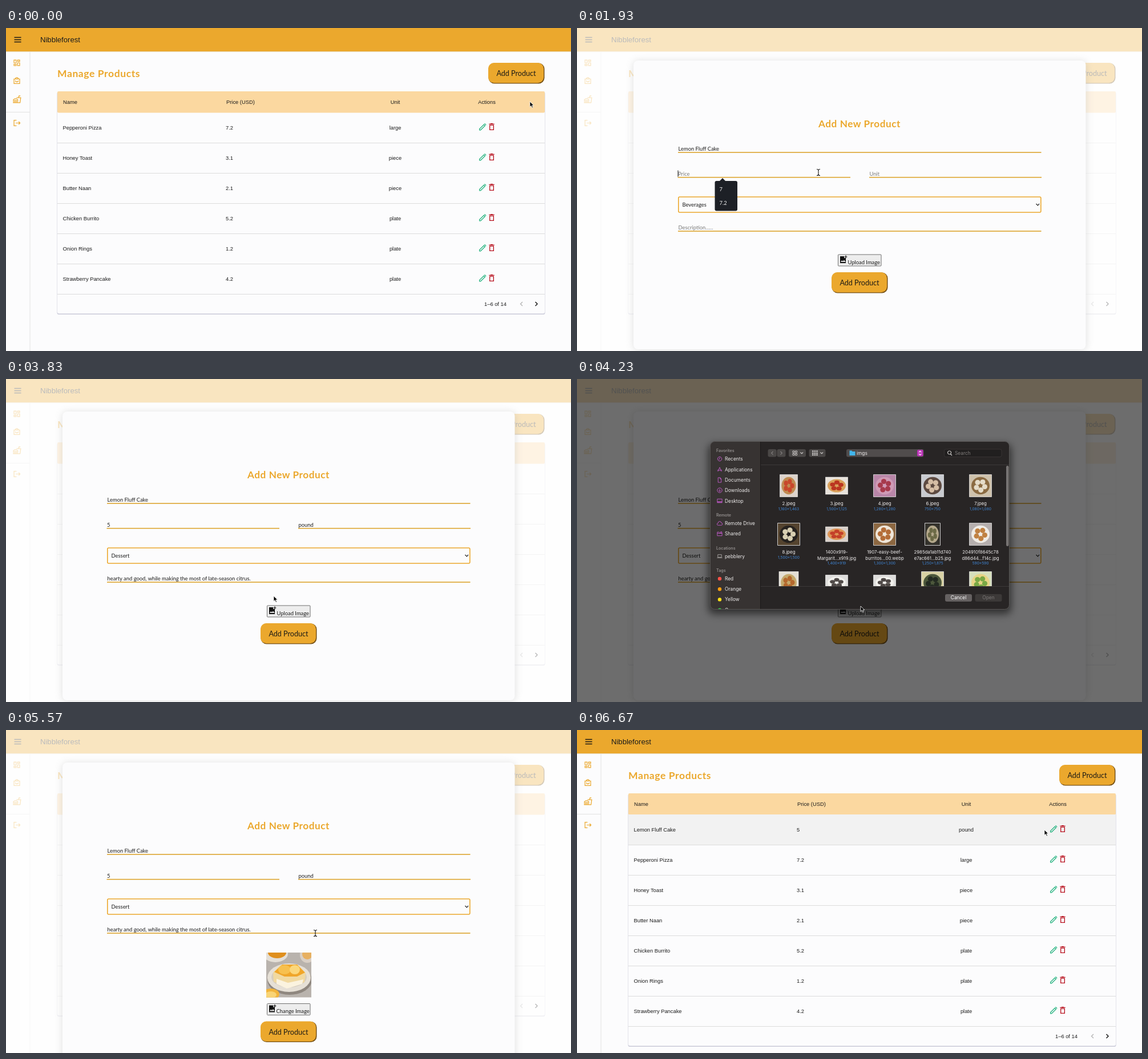
Recreate the animation shown at these times as an HTML page. Size 990 px wide and 566 px high, loop 6.71 s.

```html
<!DOCTYPE html>
<html lang="en">
<head>
<meta charset="utf-8">
<title>Manage products</title>
<style>
  html, body { margin: 0; width: 100%; height: 100%; overflow: hidden; background: #fcfcfd; }
  svg { display: block; width: 990px; height: 566px; }
  text { white-space: pre; }
  .q { font-family: Lato, "Open Sans", sans-serif; }
  .h { font-family: "Liberation Sans", Arial, sans-serif; }
  .m { font-family: Inter, Roboto, sans-serif; }
</style>
</head>
<body>
<svg id="stage" viewBox="0 0 990 566"></svg>
<script>
const LOOP = 6710, GOLD = '#eba82d', PINK = '#c25bcb';
const stage = document.getElementById('stage');

// Drawing helpers: each returns a piece of SVG markup
const rect = (x, y, w, h, fill, r = 0, more = '') =>
  `<rect x="${x}" y="${y}" width="${w}" height="${h}" rx="${r}" fill="${fill}" ${more}/>`;
const text = (x, y, str, cls, size, fill = '#1c1c1c', more = '') =>
  `<text x="${x}" y="${y}" class="${cls}" font-size="${size}" fill="${fill}" ${more}>${str}</text>`;
const mid = 'text-anchor="middle"';
const line = (d, stroke, w = 1, more = '') =>
  `<path d="${d}" fill="none" stroke="${stroke}" stroke-width="${w}" ${more}/>`;
const oval = (x, y, rx, ry, fill) =>
  `<ellipse cx="${x}" cy="${y}" rx="${rx}" ry="${ry}" fill="${fill}"/>`;
const group = (body, more) => `<g ${more}>${body}</g>`;
const icon = (x, y, d, stroke, w = 2, s = .62) =>
  group(line(d, stroke, w), `transform="translate(${x - 12 * s} ${y - 12 * s}) scale(${s})"`);
const clamp = v => Math.max(0, Math.min(1, v));
const ramp = (t, a, b) => clamp((t - a) / (b - a));
const typed = (str, t, a, b) => str.slice(0, Math.floor(str.length * ramp(t, a, b)));
const fade = (t, a, b, d) => Math.min(ramp(t, a, a + d), 1 - ramp(t, b, b + d));

const defs = `<defs>
  <clipPath id="files"><rect x="322" y="151" width="435" height="212"/></clipPath>
  <clipPath id="side"><rect x="234" y="110" width="88" height="293"/></clipPath>
  <clipPath id="photo"><rect x="456" y="390" width="79" height="78.5"/></clipPath>
  <filter id="soft" x="-20%" y="-20%" width="140%" height="140%"><feGaussianBlur stdDeviation="7"/></filter>
</defs>`;

// Cursor stops: time, x, y
const path = [
  [0, 918, 129], [330, 905, 84], [520, 905, 84], [900, 440, 211], [1600, 440, 211],
  [1800, 423, 253], [2080, 423, 253], [2220, 560, 254], [2640, 560, 254], [2820, 436, 309],
  [2970, 436, 311], [3210, 430, 338], [3300, 430, 338], [3460, 430, 350], [3720, 430, 350],
  [3920, 497, 402], [4080, 497, 402], [4200, 497, 398], [4260, 497, 398], [4500, 537, 347],
  [5130, 537, 347], [5260, 456, 300], [5320, 456, 300], [5430, 720, 382], [5480, 720, 382],
  [5565, 542, 356], [5610, 542, 356], [5800, 496, 527], [6050, 496, 527], [6600, 819, 175], [LOOP, 819, 175]
];
function cursorAt(t) {
  const i = Math.max(1, path.findIndex(p => p[0] > t));
  const [a, x, y] = path[i - 1], [b, u, v] = path[i];
  const k = ramp(t, a, b), e = k * k * (3 - 2 * k);
  return [x + (u - x) * e, y + (v - y) * e];
}
const arrow = (x, y) =>
  `<path d="M${x} ${y}v9.3l2.2-2 1.7 3.7 1.6-.7-1.7-3.6h3z" fill="#000" stroke="#fff" stroke-width=".8"/>`;
const beam = (x, y) =>
  line(`M${x - 3} ${y - 5.5}q3 0 3 2v7q0 2 3 2M${x + 3} ${y - 5.5}q-3 0-3 2v7q0 2-3 2`, '#111', 1.1);

function button(x, y) {
  return rect(x + .5, y + .5, 98, 36, '#765117', 10) + rect(x, y, 97, 35.2, GOLD, 10) +
    text(x + 49, y + 23, 'Add Product', 'q', 12.6, '#1c1a16', mid);
}

// Product list page
const foods = [
  ['Lemon Fluff Cake', '5', 'pound'], ['Pepperoni Pizza', '7.2', 'large'], ['Honey Toast', '3.1', 'piece'],
  ['Butter Naan', '2.1', 'piece'], ['Chicken Burrito', '5.2', 'plate'], ['Onion Rings', '1.2', 'plate'],
  ['Strawberry Pancake', '4.2', 'plate']
];
const pencil = 'M4 20v-3L15.5 5.5l3 3L7 20zM17 4l1-.6 2.6 2.6-.6 1';
const trash = 'M7 8v12h10V8zM5 5h14M9 4h6';

function page(added, hover) {
  const rows = added ? foods : foods.slice(1), end = 148 + 53 * rows.length;
  let s = rect(0, 0, 990, 566, '#fcfcfd') + rect(0, 0, 990, 41, GOLD) + rect(0, 41, 990, 1.2, '#e9dfc9') +
    line('M14.5 16.5h12M14.5 20.5h12M14.5 24.5h12', '#1c1a16', 1.4) +
    text(60, 25, 'Nibbleforest', 'h', 13.1) +
    line('M42 42V566M0 147.5H42', '#e2e2e2') +
    icon(19, 61, 'M4 4h6v8H4zM14 4h6v4h-6zM4 16h6v4H4zM14 12h6v8h-6z', GOLD) +
    icon(19, 92.5, 'M4 7h16v13H4zM8 7a4 4 0 0 1 8 0M8 11a4 4 0 0 0 8 0', GOLD) +
    icon(19, 125, 'M2 15a6.5 5 0 0 1 13 0zM1 18.5h15M1 21.5h20l2-14H11M17 7l1-5h4', GOLD) +
    icon(19, 166.5, 'M11 4H4v16h7M9 12h12M17 8l4 4-4 4', GOLD) +
    text(90, 86, 'Manage Products', 'q', 17.5, GOLD, 'font-weight="700" letter-spacing=".6"') +
    button(845, 61) +
    rect(89.5, 112, 855, end - 76, '#c9c9d8', 3) + rect(90, 111, 854, end - 76.5, '#fcfcfd', 3) +
    rect(90, 111, 854, 37.5, '#fbd8a0', 2) +
    text(100, 133, 'Name', 'h', 9.33) + text(386, 133, 'Price (USD)', 'h', 9.33) +
    text(682, 133, 'Unit', 'h', 9.33, '#1c1c1c', mid) + text(842.5, 133, 'Actions', 'h', 9.33, '#1c1c1c', mid);
  rows.forEach(([name, price, unit], i) => {
    const y = 148 + 53 * i;
    if (hover === i) s += rect(90, y, 854, 53, '#f2f2f2');
    s += text(99.5, y + 30, name, 'h', 9.33) + text(385, y + 30, price, 'h', 9.33) +
      text(682, y + 30, unit, 'h', 9.33, '#1c1c1c', mid) +
      icon(835, y + 25.5, pencil, '#2db584', 2, .667) + icon(851, y + 25, trash, '#b8111f', 2, .667) +
      line(`M90 ${y + 53.5}H944`, '#dcdcdc');
  });
  return s + text(838, end + 21, '1–6 of 14', 'h', 9.33) +
    line(`M905 ${end + 14}l-3.5 3.5 3.5 3.5`, '#b5b5b5', 1.4) +
    line(`M927.5 ${end + 14}l3.5 3.5-3.5 3.5`, '#1c1c1c', 1.5);
}

// Form for a new product
const lemonPhoto = () => group(
  rect(456, 390, 79, 79, '#b9b3ad') + oval(472, 392, 22, 15, '#e4dfd7') + oval(475, 390, 16, 10, '#df8f1d') +
  oval(528, 394, 13, 14, '#d9cfc5') + oval(528, 393, 9, 9, '#e7b061') +
  oval(497, 438, 39, 26, '#8f877f') + oval(496, 434, 38, 25, '#e6e0d6') + oval(496, 433, 31, 18, '#d6cdbf') +
  '<path d="M468 425l13-13 30-1 14 15-2 16-30 9-24-10z" fill="#f1d9a0"/>' +
  '<path d="M470 424l14-13 26 0 14 14-14 7-22 0z" fill="#f0a62a"/>' +
  oval(488, 420, 11, 8, '#f7c04e') + oval(506, 420, 9, 8, '#fbd77b') +
  '<path d="M474 436l20 7 27-6-2 8-27 8-18-8z" fill="#fbf3df"/>' +
  oval(464, 463, 15, 10, '#f2b43a') + oval(464, 464, 10, 6, '#f9d475'), 'clip-path="url(#photo)"');

function field(x, end, y, value, hint) {
  return text(x + .5, y - 3, value || hint, 'q', 9.4, value ? '#1c1c1c' : '#7b7b7b') +
    rect(x, y - .8, end - x, 1.6, '#dda52f');
}

function form(t) {
  const photo = t >= 5520, dy = photo ? 82.5 : 0;
  const price = t >= 2080 ? '5' : '';
  let s = rect(99, 58, 793, 506 + dy, '#9a9a9a', 8, 'filter="url(#soft)" opacity=".3"') +
    rect(99, 57, 792.5, 506 + dy, '#fcfcfd', 8) +
    text(495, 174, 'Add New Product', 'q', 17.2, GOLD, mid + ' font-weight="700" letter-spacing=".55"') +
    field(177, 813.5, 218, typed('Lemon Fluff Cake', t, 1000, 1650), 'Name') +
    field(176.5, 479, 261.7, price, 'Price') +
    field(512, 814, 261.7, typed('pound', t, 2280, 2600), 'Unit') +
    rect(177.8, 296, 635, 27, '#fcfcfd', 2, `stroke="${GOLD}" stroke-width="1.6"`) +
    text(184.5, 312.7, t < 3290 ? 'Beverages' : 'Dessert', 'q', 9.4) +
    line('M804.5 308l2.8 2.8 2.8-2.8', '#222', 1.2) +
    field(177, 813.5, 356, typed('hearty and good, while making the most of late-season citrus.', t, 3490, 3700), 'Description......');
  if (t >= 1840 && !price) {
    s += line('M177 249.5v11', '#111') +
      '<path d="M249 269l6-6 6 6z" fill="#1d2026"/>' + rect(241.5, 268, 39.5, 52.5, '#1d2026', 3) +
      text(249.5, 286, '7', 'q', 9.4, '#eee') + text(249.5, 310, '7.2', 'q', 9.4, '#eee');
  }
  if (photo) s += lemonPhoto();
  const y = 397 + dy;
  return s + rect(457.5, y, 75.5, 20, '#ededed', 1, 'stroke="#6f6f6f"') +
    `<path d="M461 ${y + 3}h7v3h3v9h-10z" fill="#111"/>` +
    `<path d="M462 ${y + 13}l2.3-3 1.6 2 2-2.6 2.8 3.6z" fill="#ededed"/>` +
    line(`M471 ${y + 1.5}v5M468.5 ${y + 4}h5`, '#111', 1.2) +
    text(photo ? 473.5 : 474.5, y + 16.5, photo ? 'Change Image' : 'Upload Image', 'q', 9.4) +
    button(446, 428 + dy);
}

function menu(y) {
  const pick = Math.max(0, Math.min(5, Math.floor((y - 273.8) / 14.4)));
  return rect(172, 272, 596, 94, '#000', 5, 'filter="url(#soft)" opacity=".35"') +
    rect(172, 270, 595.5, 93, '#5f5d59', 5, 'stroke="#4b4a47" stroke-width=".8"') +
    rect(176, 273.8 + 14.4 * pick, 588, 14.4, '#d350cf', 3) +
    line('M178.5 310l2 2.4 3.6-5.6', '#fff', 1.1) +
    ['Salad', 'Breakfast', 'Beverages', 'Main Course', 'Dessert', 'Combo Pack']
      .map((name, i) => text(188, 284 + 14.4 * i, name, 'm', 8.25, '#fff')).join('');
}

// File chooser: name lines, size, thumbnail width and height, backdrop, plate, food
const files = [
  ['2.jpeg', '1,160×1,463', 30, 38, '#ddd3cb', '#c08b52', '#c8472c'],
  ['3.jpeg', '1,500×1,125', 38, 29, '#e8e2da', '#d9a05a', '#bb3520'],
  ['4.jpeg', '1,280×1,280', 38, 38, '#b986a8', '#cf9ab5', '#a73a4c'],
  ['6.jpeg', '750×750', 38, 38, '#c9cbd0', '#5d4a41', '#d5bda5'],
  ['7.jpeg', '1,080×1,080', 38, 38, '#cfc2ac', '#8b6b42', '#e5dcc9'],
  ['8.jpeg', '1,500×1,500', 38, 38, '#55442f', '#26221f', '#d8cfb2'],
  ['1400x919-|Margarit…x919.jpg', '1,400×919', 38, 25, '#d9cfc8', '#dd9555', '#c43f29'],
  ['1907-easy-beef-|burritos…00.webp', '1,300×1,300', 38, 38, '#8c6741', '#eee5d8', '#b46d38'],
  ['2985da1ab11d740|e7ac661…b25.jpg', '1,250×1,875', 26, 38, '#34322c', '#b4a88b', '#6c6a46'],
  ['204910f8645c78|d86d44…f14c.jpg', '590×590', 38, 38, '#b6afae', '#f0ece6', '#c08142'],
  ['Caesar Salad.jpeg', '1,200×1,396', 33, 38, '#e3dfd4', '#c4a96c', '#b4682d'],
  ['dessert1.jpg', '4,998×3,332', 38, 26, '#dedddb', '#f2f1ed', '#504a48'],
  ['dessert1.webp', '4,998×3,332', 38, 26, '#dedddb', '#f2f1ed', '#504a48'],
  ['gimbap.jpg', '1,060×1,060', 38, 38, '#d8d1a4', '#4c573b', '#242b22'],
  ['IMG_9739-2-500|x500.jpg', '500×500', 38, 38, '#d6dfbc', '#e7d485', '#79a844'],
  ['Japanese-|souffle-…bnail.jpg', '1,200×1,200', 38, 38, '#dfc4a4', '#f4dfab', '#cb4a3c'],
  ['Lemon-Cake-for-|a-Crow…1-of-1.jpg', '640×945', 26, 38, '#b8afa7', '#ece2d0', '#e4a43c'],
  ['onion-rings.jpg', '1,280×875', 38, 26, '#6a4432', '#dbc5b0', '#a5441e'],
  ['Quinoa-Salad-|Recipe-…-4.webp', '1,300×1,950', 26, 38, '#e3e0da', '#70684c', '#d1b250'],
  ['Strawberry-|Frappe.jpg', '1,024×1,024', 38, 38, '#c9d0d2', '#e8b5ba', '#c6565e']
];

function fileCell([name, size, w, h, back, plate, food], i, chosen) {
  const x = 371 + 84 * (i % 5), y = 187 + 85 * Math.floor(i / 5), lines = name.split('|');
  let s = '';
  if (chosen) s += rect(x - 23, y - 23, 46, 46, '#4a4747', 4) +
    rect(x - 35, y + 26, 70, 11 * lines.length, '#b32fae', 3);
  s += rect(x - w / 2 - .8, y - h / 2 - .8, w + 1.6, h + 1.6, '#f4f4f4') + rect(x - w / 2, y - h / 2, w, h, back) +
    oval(x, y, w * .42, h * .4, plate);
  for (let k = 0; k < 5; k++) {
    const a = k * 1.257 + i;
    s += oval(x + Math.cos(a) * w * .2, y + Math.sin(a) * h * .2, w * .12, h * .12, food);
  }
  lines.forEach((l, k) => s += text(x, y + 34 + 10.6 * k, l, 'm', 7.8, '#f0eeee', mid));
  return s + text(x, y + 33.3 + 10 * lines.length, size, 'm', 6.6, '#3f87d8', mid);
}

const places = [
  ['Recents', 140, 'M12 4a8 8 0 1 0 .1 0zM12 7v5l-4 2'],
  ['Applications', 158.5, 'M12 4L5 20M12 4l7 16M3 15h18'],
  ['Documents', 177, 'M6 3h8l4 5v13H6zM14 3v5h4'],
  ['Downloads', 195, 'M12 3a9 9 0 1 0 .1 0zM12 7v9M8 13l4 4 4-4'],
  ['Desktop', 213.5, 'M3 5h18v14H3zM3 15h18M3 17h18'],
  ['Remote Drive', 253, 'M6 19a4 4 0 0 1 0-8a6 6 0 0 1 12-1a4.500 4.500 0 0 1 0 9z'],
  ['Shared', 271, 'M3 6h6l2 2h10v12H3zM3 11h18M15 5h6'],
  ['pebblery', 310.5, 'M5 6h14v10H5zM2 18h20']
];

function chooser(t, scroll) {
  const ready = t >= 5300;
  let side = [['Favorites', 128], ['Remote', 241], ['Locations', 299], ['Tags', 338]]
    .map(([s, y]) => text(244, y, s, 'm', 7.1, '#928e8d', 'font-weight="600"')).join('');
  places.forEach(([name, y, d], i) =>
    side += icon(250, y, d, i === 7 ? '#aaa6a5' : PINK, 2, .46) + text(259, y + 3, name, 'm', 8.35, '#efeded'));
  [['Red', '#ff5347'], ['Orange', '#ff9f0f'], ['Yellow', '#ffe016'], ['Green', '#32d74b']].forEach(([name, c], i) =>
    side += oval(250, 350 + 18.2 * i, 3.2, 3.2, c) + text(259, 353 + 18.2 * i, name, 'm', 8.35, '#efeded'));

  const cells = files.map((f, i) => fileCell(f, i, ready && i === 16)).join('');
  const tool = '#4a4746', pale = '#d5d2d1';
  return rect(230, 114, 531, 298, '#000', 10, 'filter="url(#soft)" opacity=".55"') +
    rect(233.5, 109.5, 524, 294, '#282525', 8) +
    '<path d="M241.5 109.500H321.5V403.5H241.500a8 8 0 0 1-8-8V117.500a8 8 0 0 1 8-8z" fill="#373332"/>' +
    group(side, 'clip-path="url(#side)"') +
    line('M321.5 110V403', '#1c1a1a') + line('M322 150.500H757M322 363.500H757', '#3c3939') +
    rect(334.5, 123, 15, 13.5, tool, 3) + rect(350.5, 123, 15, 13.5, tool, 3) +
    line('M343.5 127l-2.800 2.800 2.800 2.800M356.500 127l2.800 2.800-2.800 2.800', '#858180', 1.1) +
    rect(371, 123, 30, 13.5, tool, 3) + rect(406.5, 123, 29, 13.5, tool, 3) +
    line('M378 126h3v3h-3zM382.500 126h3v3h-3zM378 130.500h3v3h-3zM382.500 130.500h3v3h-3z', pale, .9) +
    line('M412 126.500h10M412 130h10M412 133h10', pale, 2, 'stroke-dasharray="2.600 1"') +
    line('M391.500 128.500l2.300 2.300 2.300-2.300M426.500 128.500l2.300 2.300 2.300-2.300', pale, 1.1) +
    rect(472, 123, 135.5, 13.5, '#504c4c', 3) +
    '<path d="M477.500 125.500h4l1 1.500h5v7h-10z" fill="#42b5ec"/>' + text(490, 132.7, 'imgs', 'm', 8.35, '#f0eeee') +
    rect(596, 124, 10.5, 11.5, '#bb31b7', 2.5) + line('M599 128.500l2.200-2.200 2.200 2.200M599 131l2.200 2.200 2.200-2.200', '#fff', 1.1) +
    rect(643.5, 123, 100.5, 13.5, '#211f1f', 3, 'stroke="#3f3c3b" stroke-width=".7"') +
    line('M652.500 126a3 3 0 1 0 .1 0M654.500 131.500l2.500 2.500', pale, 1.1) + text(662, 133, 'Search', 'm', 8.35, '#827e7d') +
    group(group(cells, `transform="translate(0 ${-140 * scroll})"`), 'clip-path="url(#files)"') +
    rect(752, 152 + 69 * scroll, 4.5, 141, '#777473', 2.2) +
    rect(645, 377, 47, 13, '#656161', 3) + text(668.5, 386.2, 'Cancel', 'm', 8.35, '#fff', mid) +
    rect(697.5, 377, 47, 13, ready ? '#b32fae' : '#3c3938', 3) +
    text(721, 386.2, 'Open', 'm', 8.35, ready ? '#fff' : '#7e7a79', mid) +
    rect(233.5, 109.5, 524, 294, 'none', 8, 'stroke="#5d5a59" stroke-width=".9"');
}

function draw(t) {
  const [x, y] = cursorAt(t);
  const modal = fade(t, 480, 6000, 90), dialog = fade(t, 4040, 5490, 50);
  const hover = !modal && x > 90 && x < 944 && y > 148 ? Math.floor((y - 148) / 53) : -1;
  const open = t >= 2940 && t < 3290;
  let s = defs + page(t >= 6000, hover);
  if (modal) s += group(rect(0, 0, 990, 566, '#fff', 0, 'opacity=".7"') + form(t), `opacity="${modal}"`);
  if (open) s += menu(y);
  if (dialog) {
    const p = ramp(t, 4560, 4980);
    s += group(rect(0, 0, 990, 566, '#000', 0, 'opacity=".57"') + chooser(t, p * p * (3 - 2 * p)), `opacity="${dialog}"`);
  }
  const onField = modal === 1 && !open && !dialog && x > 177 && x < 813 &&
    [[202, 219], [245, 263], [340, 358]].some(([a, b]) => y > a && y < b);
  return s + (onField ? beam(x, y) : arrow(x, y));
}

let last = '';
const start = performance.now();
function tick() {
  const next = draw((performance.now() - start) % LOOP);
  if (next !== last) stage.innerHTML = last = next;
  requestAnimationFrame(tick);
}
tick();
</script>
</body>
</html>
```
